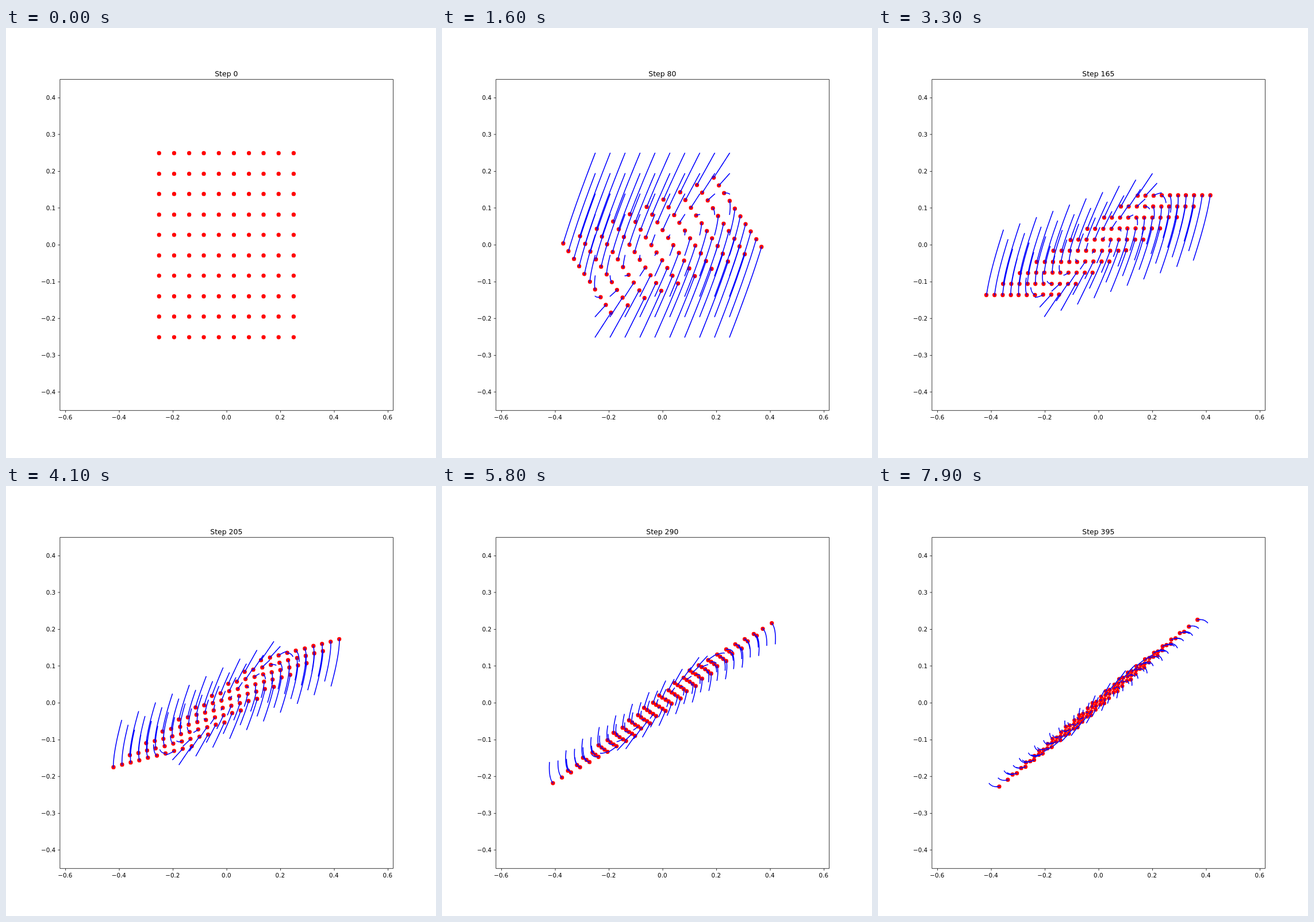
Animation of 748 by 748 pixels, one loop 8000 ms. Source, as an HTML page:

```html
<!DOCTYPE html>
<html lang="en">
<head>
<meta charset="utf-8">
<title>Linear flow</title>
<style>
  html, body { margin: 0; width: 100%; height: 100%; overflow: hidden; background: #fff; }
  svg { display: block; width: 100vw; height: 100vh; }
  text { font-family: "DejaVu Sans", sans-serif; font-size: 13.89px; text-anchor: middle; }
  #title { font-size: 16.67px; }
  .y { text-anchor: end; }
  #axes { fill: none; stroke: #000; stroke-width: 1.05; }
  #dots { stroke: #f00; stroke-width: 9.72; stroke-linecap: round; }
  #trails { fill: none; stroke: #00f; stroke-width: 2.083; stroke-linecap: square; stroke-linejoin: round; }
</style>
</head>
<body>
<svg viewBox="0 0 1000 1000">
  <path id="dots"/>
  <path id="trails"/>
  <path id="axes"/>
  <g id="labels"></g>
  <text id="title" x="512.5" y="111.67"></text>
</svg>
<script>
const LOOP = 8000, FRAME = 100, STEPS_PER_FRAME = 5, DT = 0.01;
const TRAIL = 100, SEGMENTS = 25, GRID = 10;

const byId = id => document.getElementById(id);
const px = x => 512.5 + 625 * x;
const py = y => 505 - 770 / 0.9 * y;
const snap = v => Math.floor(v + 0.5) + 0.5;

function drawAxes() {
  let path = 'M125.5 119.5H900.5V889.5H125.5Z', labels = '';
  const format = v => v.toFixed(1).replace('-', '\u2212');
  for (let i = -3; i <= 3; i++) {
    const x = px(i / 5);
    path += `M${snap(x)} 889.5v4.86`;
    labels += `<text x="${x}" y="911">${format(i / 5)}</text>`;
  }
  for (let i = -4; i <= 4; i++) {
    const y = py(i / 10);
    path += `M125.5 ${snap(y) - 1}h-4.86`;
    labels += `<text class="y" x="115.28" y="${y + 5}">${format(i / 10)}</text>`;
  }
  byId('axes').setAttribute('d', path);
  byId('labels').innerHTML = labels;
}

// exp(A t) for A = [[0.25, -0.6], [0.6, -1]]
function flow(step) {
  const t = step * DT, mean = -0.375, w = Math.sqrt(0.625 ** 2 - 0.6 ** 2);
  const even = Math.exp(mean * t) * Math.cosh(w * t);
  const odd = Math.exp(mean * t) * Math.sinh(w * t) / w;
  const a = even + 0.625 * odd, b = 0.6 * odd, d = even - 0.625 * odd;
  return ([x, y]) => [px(a * x - b * y), py(b * x + d * y)];
}

const coord = i => -0.25 + 0.5 * i / (GRID - 1);
const seeds = Array.from({ length: GRID * GRID },
  (_, i) => [coord(i % GRID), coord(Math.floor(i / GRID))]);

function render(step) {
  const first = Math.max(0, step - TRAIL);
  const maps = Array.from({ length: SEGMENTS + 1 },
    (_, i) => flow(first + (step - first) * i / SEGMENTS));
  const now = maps[SEGMENTS];
  byId('dots').setAttribute('d',
    seeds.map(p => `M${now(p).map(Math.round)}h0`).join(''));
  byId('trails').setAttribute('d', step === 0 ? '' :
    seeds.map(p => 'M' + maps.map(m => m(p).map(v => v.toFixed(2))).join('L')).join(''));
  byId('title').textContent = 'Step ' + step;
}

let shown = -1;
const start = performance.now();
function tick() {
  const time = (performance.now() - start) % LOOP;
  const step = Math.floor(time / FRAME) * STEPS_PER_FRAME;
  if (step !== shown) render(shown = step);
  requestAnimationFrame(tick);
}

drawAxes();
tick();
</script>
</body>
</html>
```
